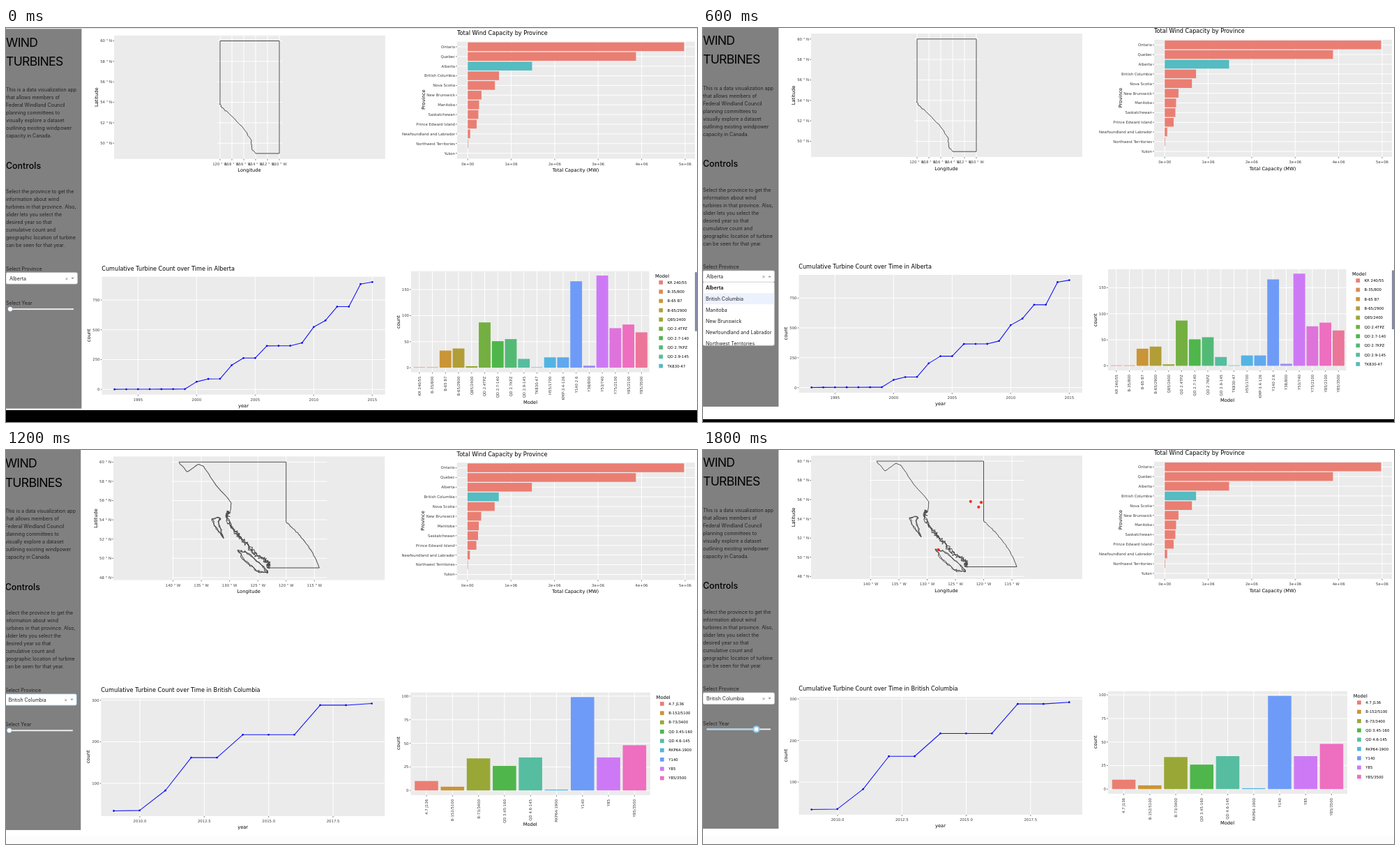
An HTML page with a canvas that plays this animation: 991 px wide and 565 px high, repeating every 2.4 s.

```html
<!DOCTYPE html>
<html lang="en">
<head>
<meta charset="utf-8">
<title>Wind turbines dashboard</title>
<style>
  html, body { margin: 0; width: 991px; height: 565px; overflow: hidden; background: #fff; }
  canvas { display: block; }
</style>
</head>
<body>
<canvas id="stage" width="991" height="565"></canvas>
<script>
const ctx = document.getElementById('stage').getContext('2d');
const UI = 'Inter, sans-serif', PLOT = '"DejaVu Sans", sans-serif';
const WHEEL = ['#ea7e73', '#ca9537', '#99a736', '#4fb64b', '#56bda0', '#53b4e3', '#6e9bf8', '#cd79f5', '#ee6ec0'];
const RED = WHEEL[0], TEAL = '#54bcc2', PANEL = '#ebebeb';
const range = (n, f) => Array.from({ length: n }, (_, i) => f(i));

// Colour of bar i of n, mixed from the two nearest colours of the wheel
function hue(i, n) {
  const at = i / n * WHEEL.length, k = Math.floor(at), t = at - k;
  const channel = (hex, c) => parseInt(hex.substr(1 + 2 * c, 2), 16);
  const next = WHEEL[(k + 1) % WHEEL.length];
  return `rgb(${range(3, c => Math.round(channel(WHEEL[k], c) * (1 - t) + channel(next, c) * t))})`;
}

function rect(x, y, w, h, color) {
  ctx.fillStyle = color;
  ctx.fillRect(x, y, w, h);
}

function dot(x, y, r, color) {
  ctx.fillStyle = color;
  ctx.beginPath();
  ctx.arc(x, y, r, 0, 7);
  ctx.fill();
}

function stroke(points, color, width = 1) {
  ctx.strokeStyle = color;
  ctx.lineWidth = width;
  ctx.lineJoin = 'round';
  ctx.beginPath();
  points.forEach(([x, y]) => ctx.lineTo(x, y));
  ctx.stroke();
}

// y is the middle of the capitals
function text(str, x, y, size, { font = PLOT, align = 'left', color = '#000', weight = 400, spacing = 0, up } = {}) {
  ctx.save();
  ctx.translate(x, y);
  if (up) ctx.rotate(-Math.PI / 2);
  ctx.font = `${weight} ${size}px ${font}`;
  ctx.letterSpacing = spacing + 'px';
  ctx.textAlign = align;
  ctx.fillStyle = color;
  ctx.fillText(str, 0, size * 0.36);
  ctx.restore();
}

const ui = (str, x, y, size = 7, opts) => text(str, x, y, size, { font: UI, color: '#222', ...opts });
const lines = (list, y) => list.forEach((s, i) => ui(s, 0, y + 11 * i));
const title = (str, x, y) => text(str, x, y, 8.13);
const axisTitle = (str, x, y, up) => text(str, x, y, 6.7, { align: 'center', up });
const tick = (str, x, y, align, up) => text(str, x, y, 5.35, { align, up, color: '#3c3c3c' });

// n ticks as [position, label], evenly spaced
const ticks = (n, from, step, label) => range(n, i => [from + step * i, label(i)]);

// Grey plot area with white grid, tick marks and labels
function plot({ x, y, r, b, xTicks, yTicks, gridFrom = x, gridTo = r, upright }) {
  rect(x, y, r - x, b - y, PANEL);
  for (const [py, label] of yTicks) {
    stroke([[gridFrom, py], [gridTo, py]], '#fff');
    stroke([[x - 2, py], [x, py]], '#555', 0.7);
    tick(label, x - 3, py, 'right');
  }
  for (const [px, label] of xTicks) {
    stroke([[px, y], [px, b]], '#fff');
    stroke([[px, b], [px, b + 2]], '#555', 0.7);
    if (upright) tick(label, px, b + 6, 'right', true);
    else tick(label, px, b + 7.3, 'center');
  }
}

// Splits each segment and shakes the inner points
function rough(points, amp, parts, seed = 7) {
  const rand = () => (seed = seed * 16807 % 2147483647) / 2147483647 - 0.5;
  const out = [points[0]];
  for (let i = 1; i < points.length; i++) {
    const [ax, ay] = points[i - 1], [bx, by] = points[i];
    for (let k = 1; k <= parts; k++) {
      const s = k / parts, a = k < parts ? amp : 0;
      out.push([ax + (bx - ax) * s + rand() * a, ay + (by - ay) * s + rand() * a]);
    }
  }
  return out;
}

// Yearly totals between key years
function yearly(keys) {
  const out = [];
  keys.forEach(([year, n], i) => {
    const [nextYear, next] = keys[i + 1] || [year + 1, n];
    for (let y = year; y < nextYear; y++) out.push(n + (next - n) * (y - year) / (nextYear - year));
  });
  return out;
}

const ROCKIES = [[307, 105], [309, 111], [324, 124], [341, 142], [351, 157], [353, 172], [358, 177.2]];
const EAST = [[402.5, 101], [410, 109], [421, 120], [430, 131], [440, 145], [446, 157], [450, 167.5]];
const NORTHWEST = [[249, 16], [261, 30], [277, 19], [284, 22], [302, 49], [320, 69], [324, 75], [322, 87]];
const COAST = [[321, 87], [318, 95], [328, 115], [338, 125], [350, 138], [361, 150], [377, 159], [378, 167.5]];
const HAIDA = [[296, 97], [308, 96], [306, 104], [313, 125], [301, 108], [296, 97]];
const ISLAND = [[333, 142], [345, 145], [367, 163], [376, 175], [360, 172], [343, 157], [333, 142]];

const alberta = {
  name: 'Alberta',
  map: {
    xTicks: ticks(6, 307, 17, i => `${120 - 2 * i} ° W`),
    yTicks: ticks(6, 15.8, 29.35, i => `${60 - 2 * i} ° N`),
    gridFrom: 303, gridTo: 396,
    shapes: [[[307, 105], [307, 15.8], [392, 15.8], [392, 177.2], [358, 177.2]], rough(ROCKIES, 2, 6)]
  },
  line: {
    xTicks: ticks(5, 189.3, 84, i => 1995 + 5 * i),
    yTicks: ticks(4, 515.6, -42.77, i => 250 * i),
    step: 16.8, zero: 515.6, unit: 0.1711,
    counts: yearly([[1993, 1], [1999, 3], [2000, 64], [2001, 88], [2002, 89], [2003, 203], [2004, 263], [2005, 263],
      [2006, 365], [2008, 366], [2009, 390], [2010, 523], [2011, 578], [2012, 694], [2013, 694], [2014, 883], [2015, 900]])
  },
  bars: {
    right: 922.5, bottom: 491, first: 592.8, step: 18.74, zero: 484.5, unit: 0.747, tickStep: 50, tickCount: 4,
    legendX: 931, titleY: 533.5,
    models: [['KR 240/55', 1], ['B-35/800', 1], ['B-65 B7', 33], ['B-65/2900', 37], ['Q85/2400', 3],
      ['QD 2.4TPZ', 87], ['QD 2.7-140', 51], ['QD 2.7KPZ', 55], ['QD 2.9-145', 17], ['TK830-47', 1],
      ['H55/1700', 20], ['KMP-3.4-126', 20], ['Y140 2.6', 166], ['Y38/800', 4], ['Y53/740', 177],
      ['Y75/2100', 76], ['Y85/2100', 83], ['Y85/3500', 68]]
  }
};

const columbia = {
  name: 'British Columbia',
  map: {
    xTicks: ticks(6, 240.5, 40.5, i => `${140 - 5 * i} ° W`),
    yTicks: ticks(7, 16, 27.56, i => `${60 - 2 * i} ° N`),
    gridFrom: 239, gridTo: 461,
    shapes: [[[249, 16], [402.5, 16], [402.5, 101]], rough(EAST, 1.6, 5), [[450, 167.5], [378, 167.5]],
      rough(NORTHWEST, 1.2, 5), ...range(3, i => rough(COAST, 6, 9, 11 + 18 * i)),
      ...range(2, i => rough(HAIDA, 3, 5, 5 + i)), ...range(2, i => rough(ISLAND, 3.4, 7, 3 + i))]
  },
  line: {
    xTicks: ticks(4, 193, 92.25, i => (2010 + 2.5 * i).toFixed(1)),
    yTicks: ticks(3, 476.2, -59.6, i => 100 * (i + 1)),
    step: 36.95, zero: 535.8, unit: 0.596,
    counts: yearly([[2009, 34], [2010, 35], [2011, 83], [2012, 162], [2013, 162], [2014, 217], [2016, 217],
      [2017, 288], [2018, 288], [2019, 292]])
  },
  bars: {
    right: 924, bottom: 493, first: 603.5, step: 37.25, zero: 486.3, unit: 1.351, tickStep: 25, tickCount: 5,
    legendX: 932.7, titleY: 535,
    models: [['4.7 J136', 10], ['B-152/5100', 4], ['B-73/3400', 34], ['QD 3.45-160', 26], ['QD 4.6-145', 35],
      ['RKP64-1900', 1], ['Y140', 99], ['Y85', 35], ['Y85/3500', 48]]
  }
};

const TURBINES = [[383.8, 73.8], [399, 75.2], [395.3, 81.8], [337.6, 143.2]];

// Capacity in thousands
const PROVINCES = [['Ontario', 4976], ['Quebec', 3869], ['Alberta', 1480], ['British Columbia', 720],
  ['Nova Scotia', 625], ['New Brunswick', 316], ['Manitoba', 261], ['Saskatchewan', 244],
  ['Prince Edward Island', 205], ['Newfoundland and Labrador', 56], ['Northwest Territories', 11], ['Yukon', 0]];

function drawMap({ shapes, ...axes }, turbines) {
  plot({ x: 155, y: 8, r: 543.8, b: 185, ...axes });
  shapes.forEach(s => stroke(s, '#4c4c4c'));
  if (turbines) TURBINES.forEach(([x, y]) => dot(x, y, 2.1, '#f02d20'));
  axisTitle('Longitude', 349, 201.3);
  axisTitle('Latitude', 130, 96.5, true);
}

function drawCapacity(selected) {
  const left = 662.2, unit = 62.36, top = 24.2, row = 13.88;
  title('Total Wind Capacity by Province', 647, 4.5);
  plot({
    x: 647, y: 16.8, r: 988, b: 184.8,
    xTicks: ticks(6, left, unit, i => `${i}e+0${i ? 6 : 0}`),
    yTicks: ticks(12, top, row, i => PROVINCES[i][0])
  });
  PROVINCES.forEach(([name, mw], i) =>
    rect(left, top + row * (i - 0.45), mw / 1000 * unit, row * 0.9, name === selected ? TEAL : RED));
  axisTitle('Total Capacity (MW)', 817, 201.3);
  axisTitle('Province', 598.5, 100, true);
}

function drawLine(name, { counts, step, zero, unit, ...axes }) {
  title('Cumulative Turbine Count over Time in ' + name, 137.3, 342.3);
  plot({ x: 137.5, y: 354, r: 543.8, b: 523, ...axes });
  const points = counts.map((n, i) => [155.7 + step * i, zero - unit * n]);
  stroke(points, '#1616fa', 1.1);
  points.forEach(([x, y]) => dot(x, y, 1.4, '#1010e6'));
  axisTitle('year', 340.5, 539);
  axisTitle('count', 118.5, 438, true);
}

function drawBars({ right, bottom, first, step, zero, unit, tickStep, tickCount, legendX, titleY, models }) {
  plot({
    x: 581, y: 346, r: right, b: bottom, upright: true,
    xTicks: ticks(models.length, first, step, i => models[i][0]),
    yTicks: ticks(tickCount, zero, -tickStep * unit, i => i * tickStep)
  });
  axisTitle('Model', 752, titleY);
  axisTitle('count', 562.8, 418.8, true);
  text('Model', legendX, 353, 6.7);
  models.forEach(([name, n], i) => {
    const color = hue(i, models.length), y = 362.1 + 13.31 * i;
    rect(first + step * (i - 0.45), zero - n * unit, step * 0.9, n * unit, color);
    if (i > 9) return;
    rect(legendX + 5.4, y - 2.8, 5.7, 5.7, color);
    text(name, legendX + 17.6, y, 5.35);
  });
}

function box(x, y, w, h, border) {
  ctx.beginPath();
  ctx.roundRect(x, y, w, h, 2);
  ctx.fillStyle = '#fff';
  ctx.fill();
  ctx.strokeStyle = border;
  ctx.lineWidth = 0.7;
  ctx.stroke();
}

function drawMenu() {
  const names = PROVINCES.map(p => p[0]).sort();
  ctx.save();
  box(0, 364.3, 102.3, 91, '#ccc');
  ctx.clip();
  rect(0, 380.2, 102.3, 16, '#ebf1fd');
  names.forEach((n, i) => ui(n, 4, 372.2 + 16.1 * i, 7, { weight: i ? 400 : 700 }));
  ctx.restore();
}

function drawSidebar({ place, open, focus, slider }) {
  const heading = { color: '#000', spacing: -0.7 };
  rect(-4, -1.5, 112.4, 544.5, '#808080');
  ui('WIND', 0, 17.5, 17.6, heading);
  ui('TURBINES', 0, 45, 17.6, heading);
  lines(['This is a data visualization app', 'that allows members of', 'Federal Windland Council', 'planning committees to',
    'visually explore a dataset', 'outlining existing windpower', 'capacity in Canada.'], 86.1);
  ui('Controls', 0, 195, 12.4, { color: '#000', weight: 500 });
  lines(['Select the province to get the', 'information about wind', 'turbines in that province. Also,',
    'slider lets you select the', 'desired year so that', 'cumulative count and', 'geographic location of turbine',
    'can be seen for that year.'], 232.1);

  ui('Select Province', 0, 342.3);
  box(0, 348, 102.5, 16.4, focus ? '#6fb2ea' : '#ccc');
  ui(place.name, 5, 356.3);
  ui('×', 87, 356.2, 7.5, { align: 'center', color: '#888' });
  const tip = open ? -1.3 : 1.3;
  ctx.fillStyle = '#999';
  ctx.beginPath();
  ctx.moveTo(93.3, 356.3 - tip);
  ctx.lineTo(97.9, 356.3 - tip);
  ctx.lineTo(95.6, 356.3 + tip);
  ctx.fill();

  ui('Select Year', 0, 392);
  rect(5.5, 399.5, 91.5, 1.9, '#f0f0f0');
  rect(5.5, 399.5, slider - 5.5, 1.9, '#a6d8f2');
  const held = slider > 10;
  dot(slider, 400.4, held ? 5.2 : 3.4, held ? '#8fcdf0' : '#b4dcf2');
  dot(slider, 400.4, 2.8, '#fff');
  if (open) drawMenu();
}

// view is the slight shift of the page: [scale, dx, dy]
const SCENES = [
  { place: alberta, slider: 6, view: [1, 0, 2.7], black: 548, scroll: true, topLine: true },
  { place: alberta, slider: 6, view: [1, 0, 0], black: 561, scroll: true, open: true },
  { place: columbia, slider: 6, view: [1.0013, -1.3, 1.3], focus: true },
  { place: columbia, slider: 76.5, view: [1, 0, 0], turbines: true }
];

function draw(scene) {
  const { place, view: [scale, dx, dy], black, scroll, topLine, turbines } = scene;
  ctx.setTransform(1, 0, 0, 1, 0, 0);
  rect(0, 0, 991, 565, '#fff');
  if (topLine) rect(0, 0, 991, 1, '#e2e2e2');
  if (black) rect(0, black, 991, 565 - black, '#000');
  else rect(0, 553, 991, 12, '#fcfcfc');
  ctx.setTransform(scale, 0, 0, scale, dx, dy);
  drawMap(place.map, turbines);
  drawCapacity(place.name);
  drawLine(place.name, place.line);
  drawBars(place.bars);
  drawSidebar(scene);
  if (scroll) rect(988, 347.5, 3, 84.5, '#878ca8');
}

const start = performance.now();
let shown = -1;
function loop() {
  const index = Math.floor((performance.now() - start) % 2400 / 600);
  if (index !== shown) draw(SCENES[shown = index]);
  requestAnimationFrame(loop);
}
loop();
</script>
</body>
</html>
```
